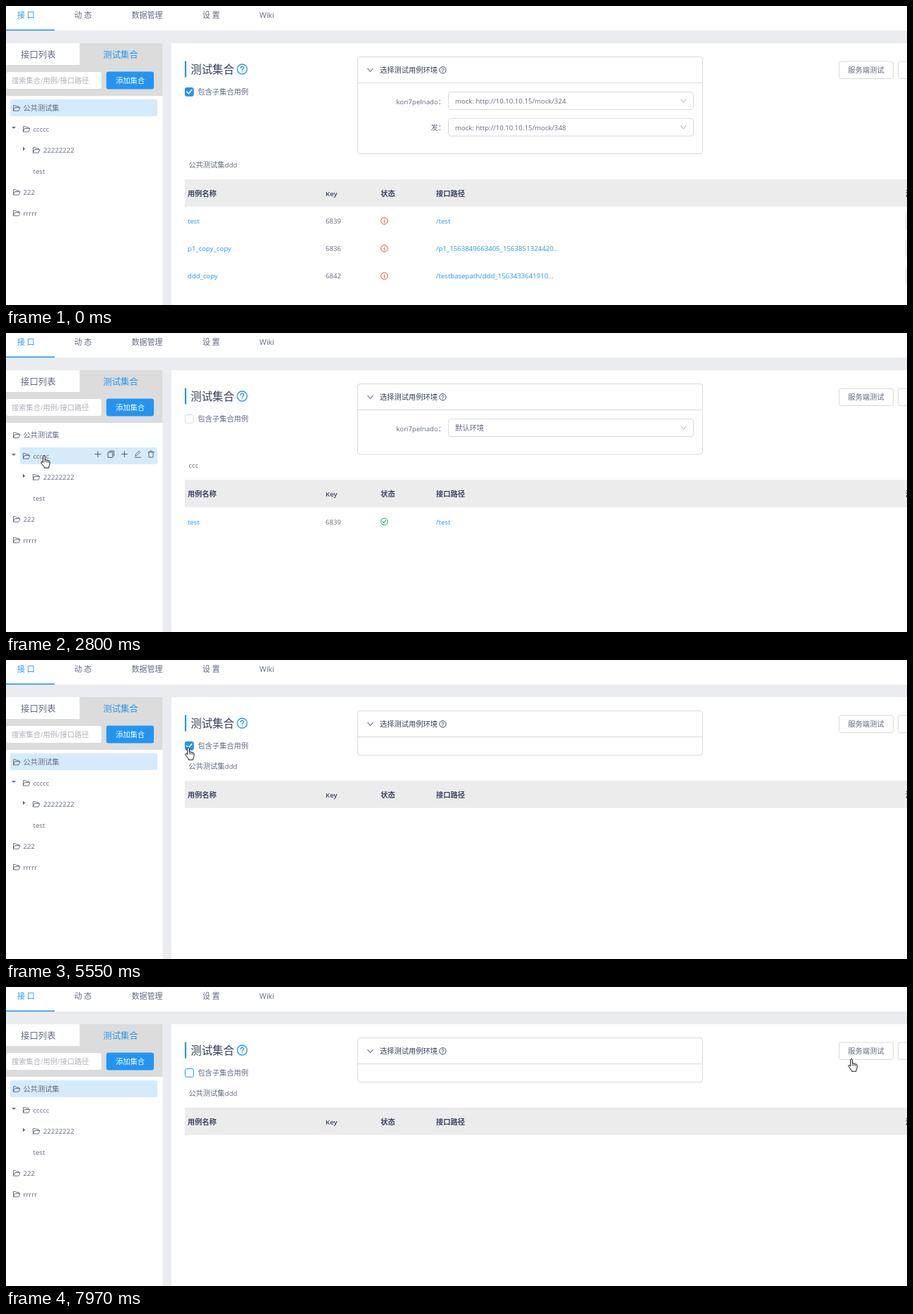
Animation, 1280 px wide and 426 px high, one loop 8000 ms. Source, as an HTML page:

```html
<!DOCTYPE html>
<html lang="zh-CN">
<head>
<meta charset="utf-8">
<title>测试集合</title>
<style>
  html, body { margin: 0; width: 100%; height: 100%; overflow: hidden; background: #fff; }
  svg { display: block; width: 100vw; height: 100vh; }
  text { font-family: "Open Sans", "Noto Sans CJK SC", "Noto Sans CJK", sans-serif; white-space: pre; }
</style>
</head>
<body>
<svg id="stage" viewBox="0 0 1280 426" preserveAspectRatio="none">
  <g id="base"></g>
  <g id="view"></g>
  <g id="cursor"></g>
</svg>
<script>
const LOOP = 8000;
const BLUE = '#2395f1', TEXT = '#626a80', DARK = '#343e58', LINE = '#d9d9d9', GRAY = '#dcdcdc';
const $ = id => document.getElementById(id);

// ---- drawing helpers ----
const rect = (x, y, w, h, fill, r = 0, stroke = 'none') =>
  `<rect x="${x}" y="${y}" width="${w}" height="${h}" rx="${r}" fill="${fill}" stroke="${stroke}"/>`;

const path = (d, stroke, w = 1, fill = 'none', x = 0, y = 0) =>
  `<path d="${d}" transform="translate(${x} ${y})" fill="${fill}" stroke="${stroke}" stroke-width="${w}" stroke-linecap="round" stroke-linejoin="round"/>`;

const ring = (x, y, r, color, w = 1) =>
  `<circle cx="${x}" cy="${y}" r="${r}" fill="none" stroke="${color}" stroke-width="${w}"/>`;

// Text centred vertically on y; Latin runs are set a little smaller than the CJK glyphs.
function label(x, y, s, { size = 10.25, fill = TEXT, weight = 400, anchor = 'start' } = {}) {
  const body = s.replace(/[!-~][ -~]*/g, m => `<tspan font-size="${size * 0.94}">${m}</tspan>`);
  return `<text x="${x}" y="${y + size * 0.38}" font-size="${size}" fill="${fill}" font-weight="${weight}" text-anchor="${anchor}">${body}</text>`;
}

const chevron = (x, y, color) => path('M-3.7 -2.2L0 2.4L3.7 -2.2', color, 1, 'none', x, y);
const folder = (x, y) =>
  path('M.5 3.5V-3.7H3.6L4.8 -2.4H8.2V-.8M.5 3.5L2.4 -.8H10L8.2 3.5Z', TEXT, 0.95, 'none', x, y);

function help(x, y, r, color, w) {
  const k = r / 7;
  return ring(x, y, r, color, w) +
    path(`M${-2.2 * k} ${-1.6 * k}C${-2 * k} ${-4.6 * k} ${2.4 * k} ${-4.4 * k} ${2.2 * k} ${-1.5 * k}C${2.1 * k} ${-.2 * k} 0 0 0 ${1.6 * k}M0 ${3.6 * k}v.2`, color, w, 'none', x, y);
}

function status(x, y, ok) {
  const color = ok ? '#00a854' : '#e8453c';
  return ring(x, y, 4.8, color) +
    path(ok ? 'M-2.2 .1L-.6 1.8L2.3 -1.6' : 'M0 -.4V2.4M0 -2.4v.1', color, 1.1, 'none', x, y);
}

function tools(y) {
  const c = '#4f5870', plus = 'M-4 0H4M0 -4V4';
  return path(plus, c, 1, 'none', 130.5, y) +
    path('M-2.2 -4.5H4V3M-4 -2.8H2V4.7H-4Z', c, 1, 'none', 149.3, y) +
    path(plus, c, 1, 'none', 168.3, y) +
    path('M-4 4.6H4.3M-3.2 2.3L-2.8 .2L2 -4.4L3.6 -2.8L-1.2 1.9Z', c, 0.9, 'none', 187, y) +
    path('M-4.2 -2.8H4.2M-1.6 -2.8V-4.5H1.6V-2.8M-3.2 -2.8L-2.8 4.5H2.8L3.2 -2.8', c, 0.9, 'none', 206, y);
}

const select = (y, s) =>
  rect(628.5, y - 12.5, 348, 25, '#fff', 3.5, LINE) + label(638, y, s) + chevron(962.5, y, '#a4a8b2');

// ---- parts that never change ----
function base() {
  const nav = [[16, '接 口'], [97, '动 态'], [178.5, '数据管理'], [279, '设 置']];
  return rect(0, 0, 1280, 426, '#ebecf0') +
    rect(0, 0, 1280, 35, '#fff') + rect(0, 33.5, 69, 1.6, BLUE) +
    nav.map(([x, s], i) => label(x, 13, s, { size: 11, fill: i ? TEXT : BLUE })).join('') +
    label(360, 13, 'Wiki', { size: 11.4 }) +
    rect(0, 53, 222.5, 373, '#fff') + rect(104.5, 53, 118, 32, GRAY) + rect(0, 84, 222.5, 44, GRAY) +
    label(21, 69, '接口列表', { size: 12.4 }) + label(138, 69, '测试集合', { size: 12.4, fill: BLUE }) +
    rect(.5, 94, 135, 24, '#fff', 3) + label(8, 106, '搜索集合/用例/接口路径', { fill: '#adb0b8' }) +
    rect(142.5, 93.5, 67.5, 25, BLUE, 3) + label(156, 106.3, '添加集合', { fill: '#fff', weight: 500 }) +
    rect(235, 53, 1045, 373, '#fff') + rect(254, 78.5, 2.2, 23, BLUE) +
    label(262.5, 90, '测试集合', { size: 15.4, fill: DARK }) + help(335.5, 90, 7, BLUE, 1.3) +
    label(272.5, 122, '包含子集合用例') +
    rect(1183.5, 79, 77, 24.5, '#fff', 3, LINE) + label(1196.3, 91.5, '服务端测试') +
    rect(1267.5, 79, 77, 24.5, '#fff', 3, LINE);
}

// ---- parts that depend on the state ----
function tree(s) {
  const mark = s.sel === 'pub' ? rect(6, 133, 209, 24, '#d5ebfc', 2) : rect(20, 163, 195, 24, '#d5ebfc', 2);
  return mark +
    folder(10, 145.5) + label(24.5, 145.3, '公共测试集') +
    path('M8 172H14L11 175Z', 'none', 0, TEXT) + folder(24, 175.3) + label(38.5, 175.3, 'ccccc') +
    path('M24 200.5V206.5L27.2 203.5Z', 'none', 0, TEXT) + folder(38, 205.3) + label(53, 205.3, '22222222') +
    label(38.5, 235.3, 'test') +
    folder(10, 265.3) + label(24.5, 265.3, '222') +
    folder(10, 295) + label(24.5, 295, 'rrrrr') +
    (s.hover === 'pub' ? tools(142.6) : s.hover === 'sub' ? tools(172.6) : '');
}

function checkbox(s) {
  const tick = 'M257 122.4L259.5 124.9L263.7 119.7';
  const full = op => `<g opacity="${op}">${rect(254.5, 116.5, 11.8, 11.8, BLUE, 2, BLUE)}${path(tick, '#fff', 1.6)}</g>`;
  const empty = edge => rect(254.5, 116.5, 11.8, 11.8, '#fff', 2, edge);
  return {
    on: full(1),
    off: empty(LINE),
    hot: empty(BLUE),
    fade: empty(BLUE) + full(.8),
    ripple: `<g opacity=".25">${rect(252.5, 114.5, 15.8, 15.8, 'none', 2.5, BLUE)}</g>` + full(1)
  }[s.box];
}

const CASES = [
  ['test', '6839', '/test'],
  ['p1_copy_copy', '6836', '/p1_1563849663405_1563851324420...'],
  ['ddd_copy', '6842', '/testbasepath/ddd_1563433641910...']
];

function main(s) {
  const envs = [0, 1, 0, 2][s.rows];
  const bottom = 135.5 + envs * 37.5, top = bottom + 36.3;
  let out = rect(499.5, 72.5, 490, bottom - 72.5, '#fff', 3.5, LINE) +
    path('M500 109.5H989.5', LINE) + chevron(517.5, 91.3, DARK) +
    label(531, 91, '选择测试用例环境', { fill: DARK }) + help(620.5, 91.3, 4.7, DARK, 0.95);

  ['kori7pelnado：', '发：'].slice(0, envs).forEach((name, i) => {
    const y = 135 + i * 37.7;
    out += label(624, y + .7, name, { anchor: 'end' }) +
      select(y, s.mock ? 'mock: http://10.10.10.15/mock/' + [324, 348][i] : '默认环境');
  });

  out += label(259.5, bottom + 15.5, s.title) + rect(254, top, 1026, 39, '#ececec');
  [[258, '用例名称'], [454, 'Key'], [532.3, '状态'], [611, '接口路径'], [1278, '测试报告']].forEach(([x, h]) =>
    out += label(x, top + 20, h, { fill: '#3c4660', weight: 600 }));

  CASES.slice(0, s.rows).forEach(([name, key, url], i) => {
    const y = top + 59.4 + i * 39.2;
    out += label(258, y, name, { fill: BLUE }) + label(454, y, key) +
      status(537.4, y, s.rows === 1) + label(611, y, url, { fill: BLUE });
    if (s.rows > 1) out += rect(1278.5, y - 12.5, 60, 25, '#fff', 3, LINE);
  });
  return out;
}

function pointer([x, y, kind]) {
  const hand = 'M5 .6C5.9 .6 6.4 1.2 6.4 2V6.8C7 6.2 8.5 6.4 8.7 7.4C9.4 6.9 10.8 7.1 11 8.2C11.8 7.7 13.2 8.1 13.2 9.4V12.6C13.2 14.4 11.9 15.3 11.8 16.8V18.2H5.4V17C4.4 15.4 2.2 13.2 1 11.2C.2 9.7 1.8 8.8 2.8 9.8L3.7 10.8V2C3.7 1.2 4.2 .6 5 .6Z';
  const arrow = 'M.5 .5V13.2L3.4 10.5L5.4 15L7.2 14.2L5.3 9.9H9.3Z';
  return kind === 'arrow'
    ? path(arrow, '#111', 0.9, '#fff', x, y)
    : path(hand, '#111', 1, '#fff', x, y) + path('M6.4 7V10M8.7 7.6V10.2M11 8.4V10.6', '#111', 0.8, 'none', x, y);
}

// ---- timeline: every step overrides part of the state ----
const DDD = '公共测试集ddd';
const at = (x, y, more, kind = 'hand') => ({ cur: [x, y, kind], ...more });
const STEPS = [
  [0, { cur: null, sel: 'pub', hover: '', box: 'on', rows: 3, mock: true, title: DDD }],
  [550, at(89, 183)],
  [700, at(70, 155)],
  [850, at(74, 144, { hover: 'pub' })],
  [1130, at(68, 180, { hover: 'sub' })],
  [1280, at(25, 165, { hover: '' })],
  [1400, at(31, 152)],
  [1550, at(31, 146, { hover: 'pub' })],
  [1670, at(30, 141)],
  [1830, at(48, 171, { hover: '' })],
  [1970, at(49, 174, { hover: 'sub' })],
  [2340, { title: 'ccc' }],
  [2490, { sel: 'sub', box: 'off' }],
  [2800, { rows: 1, mock: false }],
  [3230, at(51, 159, { hover: '' })],
  [3350, at(51, 149, { hover: 'pub' })],
  [3500, at(51, 143)],
  [3800, { title: DDD }],
  [3930, { sel: 'pub' }],
  [4200, { rows: 0 }],
  [4320, at(98, 144)],
  [4470, at(196, 132, { hover: '' }, 'arrow')],
  [4590, at(244, 125, {}, 'arrow')],
  [4740, at(253, 123, {}, 'arrow')],
  [4890, at(254, 124, { box: 'hot' })],
  [5130, { box: 'fade' }],
  [5280, { box: 'ripple' }],
  [5400, { box: 'on' }],
  [5830, { rows: 3, mock: true }],
  [6790, { box: 'fade', mock: false }],
  [6910, { box: 'hot' }],
  [7060, { rows: 0 }],
  [7610, at(318, 133, {}, 'arrow')],
  [7730, at(640, 136, {}, 'arrow')],
  [7850, at(1010, 122, {}, 'arrow')],
  [7970, at(1196, 102)]
];

let shown = -1;
function update(t) {
  const n = STEPS.filter(([start]) => start <= t).length;
  if (n === shown) return;
  shown = n;
  const s = Object.assign({}, ...STEPS.slice(0, n).map(([, part]) => part));
  $('view').innerHTML = tree(s) + checkbox(s) + main(s);
  $('cursor').innerHTML = s.cur ? pointer(s.cur) : '';
}

$('base').innerHTML = base();
const begin = performance.now();
function tick() {
  update((performance.now() - begin) % LOOP);
  requestAnimationFrame(tick);
}
tick();
</script>
</body>
</html>
```
